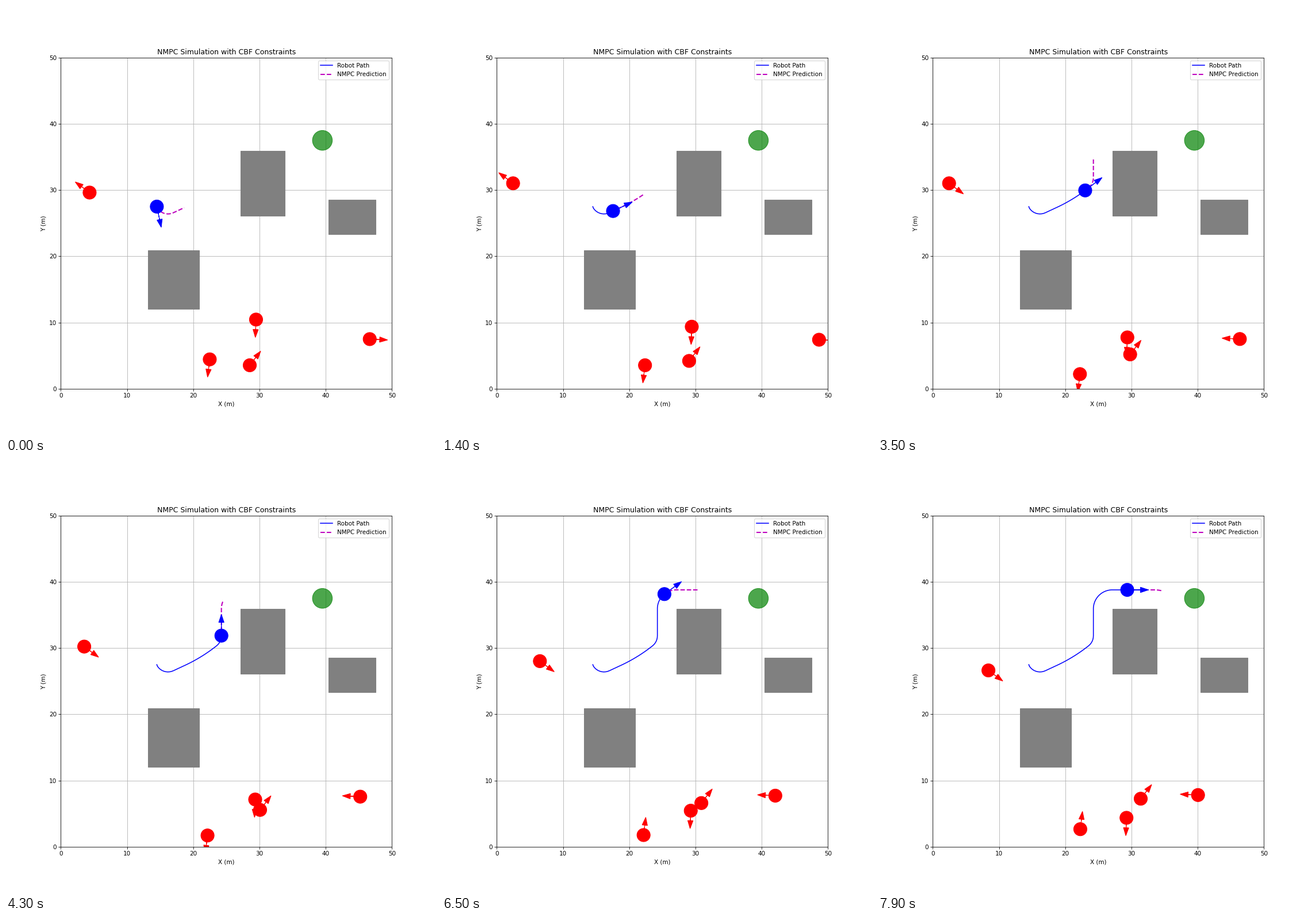
These frames come from a looping animation (748 px wide and 748 px high, 8 s). A matplotlib script:

```python
import numpy as np
import matplotlib.pyplot as plt
from matplotlib.animation import FuncAnimation
from matplotlib.patches import Circle, FancyArrow, Rectangle

FRAMES = 80
HORIZON = 18    # prediction length in frames
STEP = 0.3      # robot travel per frame at full speed
WALLS = (1, 49)

# Robot turns at a constant rate: first frame, last frame, degrees
TURNS = [(0, 11.44, 103), (18, 36, 13), (36.6, 42.4, 52),
         (56, 71, -90), (92, 95, -10)]

# Moving obstacles: start x, start y, heading in degrees, travel per frame
MOVERS = [(4.345, 29.62, 143.5, 0.168), (22.49, 4.43, 263, 0.0641),
          (29.48, 10.44, 267.8, 0.077), (28.53, 3.54, 52.3, 0.0593),
          (46.65, 7.49, -2.7, 0.1437)]

# Static obstacles: centre x, centre y, width, height
BLOCKS = [(30.5, 31, 6.72, 9.8), (17, 16.5, 7.7, 8.86),
          (44, 25.95, 7.16, 5.2)]


def unit(angle):
    return np.array([np.cos(angle), np.sin(angle)])


def robot_path():
    n = np.arange(FRAMES + HORIZON + 1)
    angle = np.radians(-78 + sum(
        deg * np.clip((n - a) / (b - a), 0, 1) for a, b, deg in TURNS))
    step = STEP * np.minimum(1, 0.2 * (n + 1))
    moves = (unit(angle) * step).T
    return np.vstack([(0, 0), np.cumsum(moves, axis=0)]) + (14.5, 27.5), angle


def mover_path(x, y, heading, speed):
    """Straight travel; turn back instead of crossing a wall."""
    pos, angle, states = np.array([x, y]), np.radians(heading), []
    for _ in range(FRAMES):
        states.append((pos, angle))
        ahead = pos + speed * unit(angle)
        if WALLS[0] <= ahead.min() and ahead.max() <= WALLS[1]:
            pos = ahead
        else:
            angle += np.pi
            states[-1] = (pos, states[-1][1])
    return states


class Agent:
    def __init__(self, color, shaft):
        self.shaft = shaft
        self.body = ax.add_patch(Circle((0, 0), 1, color=color, zorder=4))
        self.arrow = ax.add_patch(FancyArrow(
            0, 0, 1, 0, width=0.001, head_width=0.8, head_length=1.2,
            color=color, zorder=4))

    def place(self, pos, angle):
        dx, dy = self.shaft * unit(angle)
        self.body.center = pos
        self.arrow.set_data(x=pos[0], y=pos[1], dx=dx, dy=dy)


fig, ax = plt.subplots(figsize=(10, 10), dpi=74.8)
ax.set(xlim=(0, 50), ylim=(0, 50), aspect="equal",
       xlabel="X (m)", ylabel="Y (m)",
       title="NMPC Simulation with CBF Constraints")
ax.grid(True)

for cx, cy, w, h in BLOCKS:
    ax.add_patch(Rectangle((cx - w / 2, cy - h / 2), w, h,
                           color="gray", zorder=3))
ax.add_patch(Circle((39.5, 37.5), 1.5, color="green", alpha=0.7, zorder=3))

trail, = ax.plot([], [], "b-", label="Robot Path")
plan, = ax.plot([], [], "m--", lw=2, label="NMPC Prediction")
ax.legend(loc="upper right")

robot = Agent("blue", 2.0)
path, angles = robot_path()
movers = [(Agent("red", 1.5), mover_path(*m)) for m in MOVERS]


def update(n):
    trail.set_data(*path[:n + 1].T)
    plan.set_data(*path[max(n - 1, 0):n + HORIZON + 1].T)
    robot.place(path[n], angles[n])
    for agent, states in movers:
        agent.place(*states[n])
    return []


anim = FuncAnimation(fig, update, frames=FRAMES, interval=100,
                     repeat=True, repeat_delay=0)
plt.show()
```
